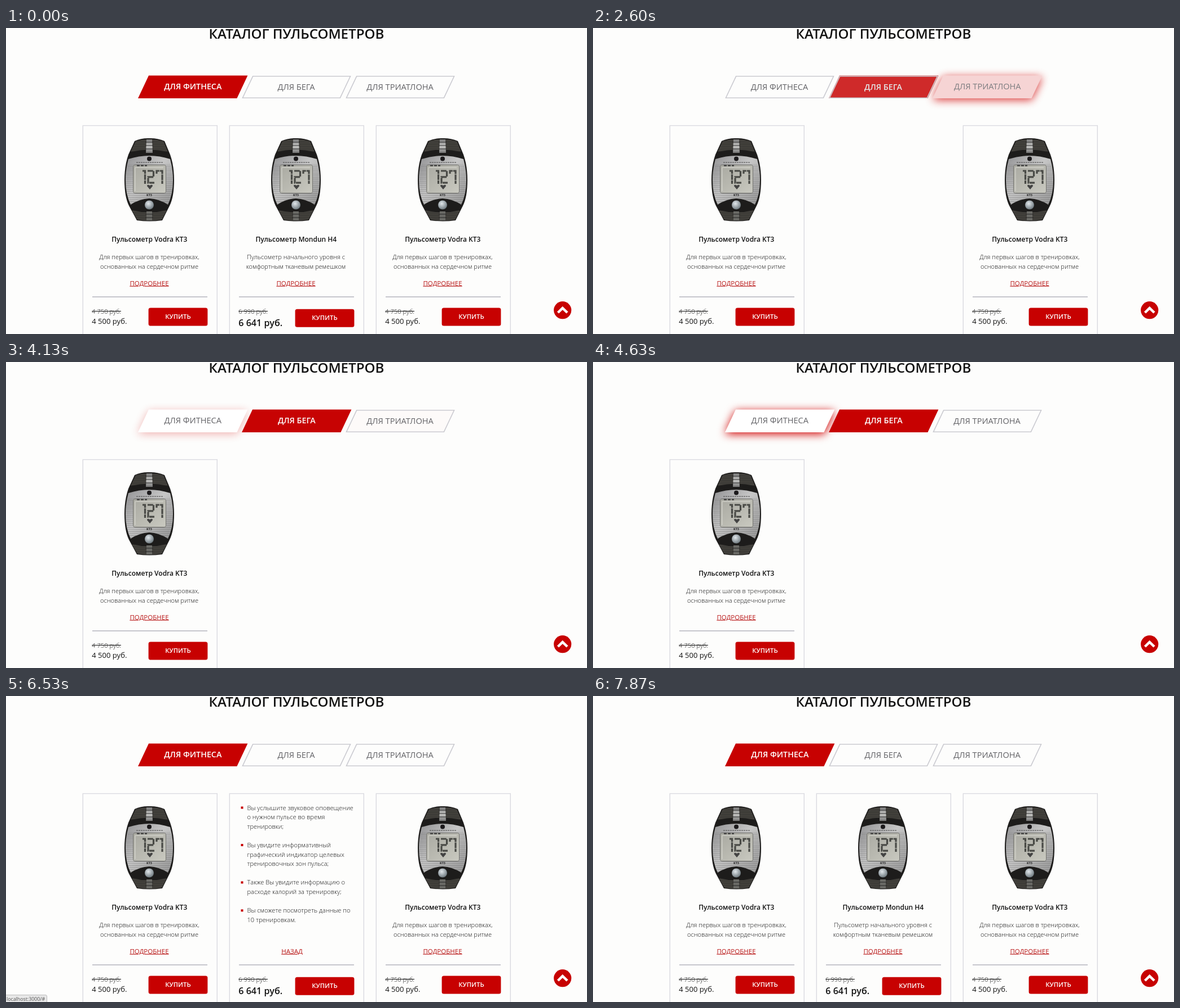
Animation, 1030 px wide and 544 px high, one loop 8 s. Source, as an HTML page:

```html
<!DOCTYPE html>
<html lang="ru">
<head>
<meta charset="utf-8">
<title>Каталог пульсометров</title>
<style>
  html, body { margin: 0; width: 100%; height: 100%; overflow: hidden; background: #fdfdfc; }
  svg { display: block; font-family: 'Open Sans', 'Noto Sans', sans-serif; }
  .head { font-size: 24.1px; font-weight: 600; fill: #111; }
  .tab { font-size: 14.6px; font-weight: 500; }
  .tab.on { font-size: 14.3px; font-weight: 600; }
  .title { font-size: 12px; font-weight: 600; fill: #111; }
  .desc { font-size: 11.05px; font-weight: 300; fill: #111; }
  .link { font-size: 11.5px; fill: #b81414; text-decoration: underline; }
  .old { font-size: 11.1px; font-weight: 300; fill: #222; text-decoration: line-through; }
  .price { font-size: 13px; fill: #111; }
  .big { font-size: 16.1px; font-weight: 600; fill: #111; }
  .buy { font-size: 11.3px; font-weight: 600; fill: #fff; }
  .mid { text-anchor: middle; }
  .glow { fill: #d00000; filter: blur(8px); }
</style>
</head>
<body>
<svg id="stage" width="1030" height="544" viewBox="0 0 1030 544">
  <defs>
    <linearGradient id="steel" x1="0" x2="1" y1="0" y2="1">
      <stop offset="0" stop-color="#929294"/><stop offset=".45" stop-color="#c6c6c6"/><stop offset="1" stop-color="#9a9a9a"/>
    </linearGradient>
    <linearGradient id="lcd" x1="0" x2="1" y1="0" y2="1">
      <stop offset="0" stop-color="#a9a9a1"/><stop offset="1" stop-color="#c9c9c0"/>
    </linearGradient>
    <linearGradient id="strip" x1="0" x2="0" y1="0" y2="1">
      <stop offset="0" stop-color="#777"/><stop offset=".5" stop-color="#c8c8c6"/><stop offset="1" stop-color="#777"/>
    </linearGradient>
    <radialGradient id="knob" cx=".4" cy=".35" r=".7">
      <stop offset="0" stop-color="#e2e8ec"/><stop offset="1" stop-color="#69747a"/>
    </radialGradient>
    <pattern id="ribs" width="4" height="3.5" patternUnits="userSpaceOnUse">
      <path d="M0 .5H4" stroke="#333" stroke-opacity=".3"/>
    </pattern>
    <pattern id="weave" width="4" height="3" patternUnits="userSpaceOnUse">
      <path d="M0 .5H4" stroke="#111" stroke-opacity=".4"/>
    </pattern>
    <clipPath id="slot"><rect x="153" y="186" width="204" height="284"/></clipPath>
    <g id="watch">
      <path fill="#1d1c1b" d="M228 201Q240 195.500 254 196Q268 195.500 281 201L291 225Q298 245 298 270Q298 300 290 316L277 342Q254 345 232 342L218 316Q210 300 210 270Q210 245 217 225Z"/>
      <path id="strap" fill="#46443f" d="M230 201Q254 195 279 201L287 220Q254 213 221 220ZM223 324Q254 331 285 324L276 341Q254 344 233 341Z"/>
      <path fill="url(#weave)" d="M230 201Q254 195 279 201L287 220Q254 213 221 220ZM223 324Q254 331 285 324L276 341Q254 344 233 341Z"/>
      <path fill="url(#strip)" d="M249 198H259L260 222H248Z"/>
      <path fill="#6a6a66" d="M249 326H259V342H249Z"/>
      <path stroke="#222" d="M247 203H261M247 209H261M247 215H261M247 331H261M247 337H261"/>
      <path fill="url(#steel)" d="M217 233Q254 221 291 233Q296 252 296 270Q296 296 287 314Q272 304 254 303Q236 304 221 314Q212 296 212 270Q212 252 217 233Z"/>
      <path fill="url(#ribs)" d="M216 242H292Q296 256 296 270Q296 296 287 314Q272 304 254 303Q236 304 221 314Q212 296 212 270Q212 256 216 242Z"/>
      <circle cx="254" cy="232.500" r="4" fill="#1c1a1c"/>
      <path stroke="#444" stroke-dasharray="3 1" d="M231 239H278"/>
      <rect x="225.500" y="243.500" width="58" height="50" rx="3" fill="url(#lcd)" stroke="#73736f"/>
      <path stroke="#444" stroke-width="2.500" stroke-dasharray="5 2" d="M232 244.500H250"/>
      <path fill="none" stroke="#dcdcd5" d="M229 290V248H279"/>
      <path fill="none" stroke="#494a46" stroke-width="3.200" stroke-dasharray="9.800 1"
        d="M242 254H246.500V277M251 254H261.500V264.800H252V275.200H263M267 259V254H277V277"/>
      <path fill="#444" d="M255 287L250 281Q250 277 255 280Q260 277 260 281Z"/>
      <text class="mid" x="254" y="299" style="font-size:5.500px;font-weight:700;fill:#222">KT3</text>
      <circle cx="254" cy="314.500" r="10.500" fill="#1d1c1b"/>
      <circle cx="254" cy="314.500" r="8" fill="url(#knob)"/>
    </g>
  </defs>
  <rect width="1030" height="544" fill="#fdfdfc"/>
  <text class="head mid" x="515" y="18.500">КАТАЛОГ ПУЛЬСОМЕТРОВ</text>
  <g id="glows"></g>
  <g id="tabs"></g>
  <g id="cards"></g>
  <circle cx="986.700" cy="501.700" r="15.600" fill="#c70101"/>
  <path d="M978.500 506L986.700 497.800L995 506" fill="none" stroke="#fff" stroke-width="4.500"/>
  <g id="status">
    <path d="M-1 531.500H70Q72.500 531.500 72.500 534V546H-1Z" fill="#e8e8e8" stroke="#bbb"/>
    <text x="1" y="542" style="font-size:8.800px;fill:#555">localhost:3000/#</text>
  </g>
</svg>
<script>
const LOOP = 8000, FADE = 500;
const $ = id => document.getElementById(id);

function add(parent, tag, attrs, text) {
  const el = document.createElementNS('http://www.w3.org/2000/svg', tag);
  for (const k in attrs) el.setAttribute(k, attrs[k]);
  if (text) el.textContent = text;
  parent.appendChild(el);
  return el;
}
const label = (parent, cls, x, y, text) => add(parent, 'text', { class: cls, x, y }, text);

// Clicks on the tabs: time, chosen tab, visible cards
const picks = [[0, 0, [1, 1, 1]], [1715, 1, [1, 0, 0]], [2530, 2, [1, 0, 1]],
               [3705, 1, [1, 0, 0]], [4680, 0, [1, 1, 1]]];
// Hover glow per tab: time, target
const hovers = [
  [[4030, 1], [4680, 0]],
  [[1130, 1], [1715, 0], [3000, 1], [3705, 0]],
  [[830, 1], [1130, 0], [2180, 1], [2530, 0]]
];
const slides = [[5990, 1], [7270, 0]];
const statusSpans = [[5800, 6700], [7170, 7710]];

const tabs = ['ДЛЯ ФИТНЕСА', 'ДЛЯ БЕГА', 'ДЛЯ ТРИАТЛОНА'].map((name, i) => {
  const x = 234 + 184 * i;
  const d = `M${x} 125L${x + 19} 84.600H${x + 194.400}L${x + 175.400} 125Z`;
  const rim = `M${x + 1.5} 124.200L${x + 19.600} 85.800H${x + 192.500}L${x + 174.400} 124.200Z`;
  return {
    glow: add($('glows'), 'path', { class: 'glow', d, transform: 'translate(0 3)' }),
    white: add($('tabs'), 'path', { d, fill: '#fff' }),
    red: add($('tabs'), 'path', { d, fill: '#c70101' }),
    rim: add($('tabs'), 'path', { d: rim, fill: 'none', stroke: '#cbcbd1', 'stroke-width': 1.6 }),
    text: label($('tabs'), 'tab mid', x + 96.5, 110, name),
    active: picks.map(p => [p[0], +(p[1] === i)]),
    hover: hovers[i]
  };
});

const starter = {
  name: 'Пульсометр Vodra KT3',
  lines: ['Для первых шагов в тренировках,', 'основанных на сердечном ритме'],
  old: '4 750 руб.', price: '4 500 руб.'
};
const basic = {
  name: 'Пульсометр Mondun H4',
  lines: ['Пульсометр начального уровня с', 'комфортным тканевым ремешком'],
  old: '6 990 руб.', price: '6 641 руб.', big: true
};
const details = [
  '*Вы услышите звуковое оповещение', 'о нужном пульсе во время', 'тренировки;', '',
  '*Вы увидите информативный', 'графический индикатор целевых', 'тренировочных зон пульса;', '',
  '*Также Вы увидите информацию о', 'расходе калорий за тренировку;', '',
  '*Вы сможете посмотреть данные по', '10 тренировкам.'
];

const cards = [starter, basic, starter].map((item, i) => {
  const g = add($('cards'), 'g', { transform: `translate(${260 * i})` });
  add(g, 'rect', { x: 136.3, y: 173.5, width: 238, height: 400, fill: 'none', stroke: '#dadae0', 'stroke-width': 1.4 });
  const slot = add(g, 'g', { 'clip-path': 'url(#slot)' });
  const front = add(slot, 'g', {});
  add(front, 'use', { href: '#watch' });
  label(front, 'title mid', 254.3, 380, item.name);
  item.lines.forEach((s, n) => label(front, 'desc mid', 254, 410.5 + 17 * n, s));
  label(front, 'link mid', 254, 457.5, 'ПОДРОБНЕЕ');
  const back = add(slot, 'g', { opacity: 0 });
  if (i === 1) {
    details.forEach((s, n) => {
      const y = 202.5 + 16.62 * n;
      if (s[0] === '*') add(back, 'rect', { x: 156.5, y: y - 6, width: 4, height: 4, fill: '#c70101' });
      label(back, 'desc', 167.5, y, s.replace('*', ''));
    });
    label(back, 'link mid', 247, 457.5, 'НАЗАД');
  }
  add(g, 'rect', { x: 153, y: 477, width: 204, height: 2, fill: '#c6c6cd' });
  label(g, 'old', 152.3, 507.5, item.old);
  label(g, item.big ? 'big' : 'price', 152.3, item.big ? 529.5 : 525.5, item.price);
  const dy = item.big ? 2.2 : 0;
  add(g, 'rect', { x: 252.6, y: 497.6 + dy, width: 104.8, height: 32, rx: 3.5, fill: '#c70101' });
  label(g, 'buy mid', 305, 517 + dy, 'КУПИТЬ');
  return { g, front, back };
});

// CSS "ease": cubic-bezier(.25, .1, .25, 1)
function ease(p) {
  if (p <= 0) return 0;
  if (p >= 1) return 1;
  let lo = 0, hi = 1, s = p;
  for (let i = 0; i < 20; i++) {
    s = (lo + hi) / 2;
    const x = .75 * s * (1 - s) + s ** 3;
    if (x < p) lo = s; else hi = s;
  }
  return .3 * s * (1 - s) ** 2 + 3 * s * s * (1 - s) + s ** 3;
}

// Value of a property that eases toward each target in turn
function follow(steps, t, start = 0) {
  let v = start;
  steps.forEach(([at, to], i) => {
    if (t < at) return;
    const end = Math.min(t, i + 1 < steps.length ? steps[i + 1][0] : t);
    v += (to - v) * ease((end - at) / FADE);
  });
  return v;
}
const last = (steps, t) => steps.filter(s => s[0] <= t).pop();
const clamp = v => Math.max(0, Math.min(1, v));

function draw(t) {
  tabs.forEach((tab, i) => {
    const on = follow(tab.active, t, i === 0 ? 1 : 0);
    const glow = follow(tab.hover, t);
    const hover = last(tab.hover, t);
    const flat = last(tab.active, t)[1] || (hover && hover[1]);
    const mix = c => Math.round(c + (255 - c) * on);
    tab.glow.setAttribute('opacity', glow);
    tab.white.setAttribute('opacity', glow > .004 ? 1 : 0);
    tab.red.setAttribute('opacity', on);
    tab.rim.setAttribute('opacity', flat ? 0 : 1);
    tab.text.setAttribute('class', on > .5 ? 'tab mid on' : 'tab mid');
    tab.text.setAttribute('fill', `rgb(${mix(98)},${mix(98)},${mix(102)})`);
    tab.text.setAttribute('transform', flat ? 'translate(.8 -1.2)' : '');
  });

  const shown = last(picks, t)[2];
  cards.forEach((c, i) => c.g.setAttribute('display', shown[i] ? 'inline' : 'none'));

  const k = follow(slides, t);
  const { front, back } = cards[1];
  front.setAttribute('transform', `translate(${-204 * k})`);
  front.setAttribute('opacity', 1 - k);
  back.setAttribute('transform', `translate(${204 * (1 - k)})`);
  back.setAttribute('opacity', k);

  const seen = statusSpans.map(([a, b]) => Math.min(clamp((t - a) / 120), clamp(1 - (t - b) / 150)));
  $('status').setAttribute('opacity', Math.max(...seen));
}

const begin = performance.now();
function tick() {
  draw((performance.now() - begin) % LOOP);
  requestAnimationFrame(tick);
}
tick();
</script>
</body>
</html>
```
